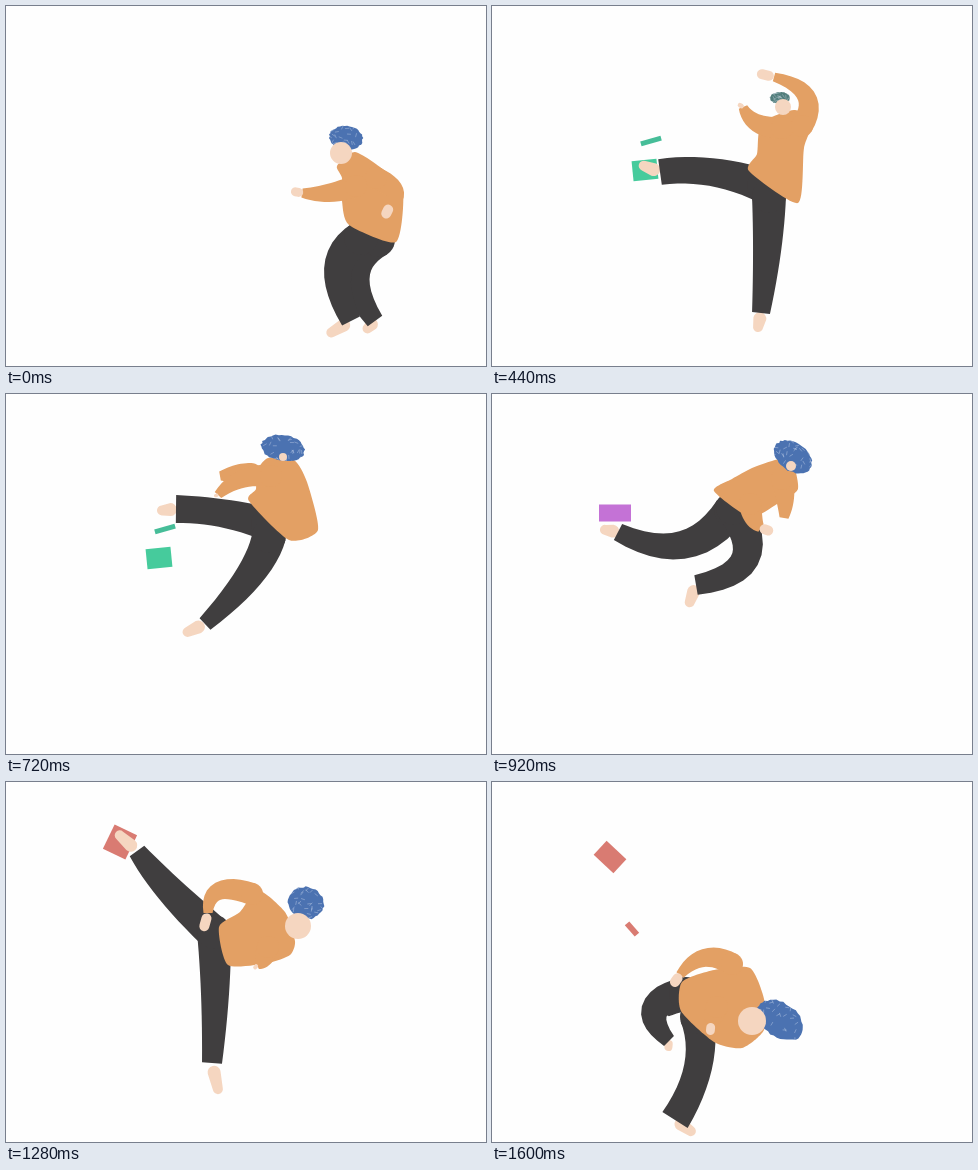
An HTML page with a canvas for the animation above (1.64 s loop, 480 px wide and 360 px high).

```html
<!DOCTYPE html>
<html lang="en">
<head>
<meta charset="utf-8">
<title>Spinning kicks</title>
<style>
html, body { margin: 0; width: 100%; height: 100%; overflow: hidden; background: #fefefe; }
canvas { display: block; width: 480px; height: 360px; }
</style>
</head>
<body>
<canvas id="stage" width="480" height="360"></canvas>
<script>
const LOOP = 1640, STEP = 40;
const CLOTH = '#e3a064', PANTS = '#403e3f', SKIN = '#f5d6c0';
const BLUE = [75, 114, 177], GREY = [82, 126, 124];
const ctx = document.getElementById('stage').getContext('2d');

// Key poses. Limbs: root, middle joint, cuff, tip. Torso: outline, clockwise.
// Face: x, y, radius. Hair: x, y, two radii, turn. Cuffs: trouser half widths.
const poses = [
  {
    legA: [372,234, 350,268, 369,315, 358,326], legB: [355,232, 332,264, 345,315, 321,329],
    armP: [350,180, 322,187, 296,187, 285,185], armQ: [370,172, 389,186, 384,200, 378,212],
    torso: [331,160, 349,146, 378,164, 397,185, 390,236, 343,219, 336,195, 336,172],
    face: [335,147,11], hair: [340,132,17,12,.1], cuffs: [9,10], tint: BLUE
  },
  {
    legA: [301,222, 317,270, 353,315, 377,327], legB: [280,222, 300,280, 274,321, 281,341],
    armP: [315,165, 320,188, 326,211, 355,232], armQ: [305,172, 308,190, 318,207, 318,207],
    torso: [306,141, 322,145, 330,157, 329,214, 314,222, 260,216, 274,190, 290,155],
    face: [328,142,11], hair: [330,125,21,9,-.1], cuffs: [8,8], tint: BLUE
  },
  {
    legA: [272,180, 219,166, 168,166, 147,158], legB: [277,190, 275,245, 269,307, 265,326],
    armP: [310,120, 314,90, 282,71, 265,67], armQ: [290,122, 265,117, 251,101, 246,98],
    torso: [278,112, 302,104, 322,112, 312,142, 306,197, 257,165, 265,148, 267,126],
    face: [291,101,8], hair: [288,92,10,6,0], cuffs: [13,9], tint: GREY
  },
  {
    legA: [262,130, 215,119, 170,115, 151,117], legB: [263,142, 243,182, 199,230, 177,240],
    armP: [265,82, 236,85, 212,101, 208,102], armQ: [245,80, 230,80, 214,82, 214,82],
    torso: [262,64, 288,66, 301,88, 312,136, 283,146, 243,107, 250,95, 250,78],
    face: [277,63,4], hair: [277,54,22,13,.15], cuffs: [14,8], tint: BLUE
  },
  {
    legA: [239,116, 190,151, 126,138, 108,135], legB: [241,114, 253,165, 204,191, 196,213],
    armP: [290,85, 293,105, 292,124, 292,124], armQ: [258,110, 262,125, 269,134, 281,138],
    torso: [280,67, 299,65, 306,95, 285,110, 258,123, 222,97, 240,85, 260,74],
    face: [299,72,5], hair: [301,63,21,14,.6], cuffs: [9,10], tint: BLUE
  },
  {
    legA: [207,150, 163,107, 131,69, 110,50], legB: [208,150, 209,212, 206,281, 213,312],
    armP: [246,112, 213,109, 202,131, 197,149], armQ: [262,165, 257,177, 251,183, 248,187],
    torso: [279,130, 289,159, 284,173, 262,181, 222,183, 213,145, 234,130, 252,108],
    face: [292,144,13], hair: [300,121,18,16,.3], cuffs: [9,10], tint: BLUE
  },
  {
    legA: [194,212, 163,229, 177,259, 176,269], legB: [205,235, 206,285, 183,338, 203,352],
    armP: [240,182, 212,176, 188,193, 180,204], armQ: [225,225, 221,236, 219,242, 218,253],
    torso: [258,186, 272,217, 272,248, 250,266, 222,260, 189,229, 190,200, 222,188],
    face: [260,239,14], hair: [288,238,26,17,.6], cuffs: [7,15], tint: BLUE
  }
];

// time in ms, position in the pose list
const timing = [[0, 0], [240, 1], [440, 2], [560, 2.75], [720, 3], [920, 4],
  [1120, 4.5], [1280, 5], [1360, 5.15], [1600, 6]];

const lerp = (a, b, k) => a + (b - a) * k;
const mixList = (a, b, k) => a.map((v, i) => lerp(v, b[i], k));
const pairs = a => a.flatMap((v, i) => i % 2 ? [] : [[v, a[i + 1]]]);

// Blend bone angles and lengths so that limbs swing on arcs.
function mixLimb(a, b, k) {
  const A = pairs(a), B = pairs(b);
  let [x, y] = mixList(A[0], B[0], k);
  return A.map((p, i) => {
    if (i) {
      const ax = p[0] - A[i - 1][0], ay = p[1] - A[i - 1][1];
      const bx = B[i][0] - B[i - 1][0], by = B[i][1] - B[i - 1][1];
      const from = Math.atan2(ay, ax), d = Math.atan2(by, bx) - from;
      const turn = from + Math.atan2(Math.sin(d), Math.cos(d)) * k;
      const len = lerp(Math.hypot(ax, ay), Math.hypot(bx, by), k);
      x += len * Math.cos(turn);
      y += len * Math.sin(turn);
    }
    return [x, y];
  });
}

function poseAt(t) {
  const i = timing.findIndex(([ms]) => ms >= t) || 1;
  const [t0, u0] = timing[i - 1], [t1, u1] = timing[i];
  const u = lerp(u0, u1, (t - t0) / (t1 - t0));
  const n = Math.min(Math.floor(u), poses.length - 2);
  const a = poses[n], b = poses[n + 1], out = {};
  for (const key in a) out[key] = (/^(leg|arm)/.test(key) ? mixLimb : mixList)(a[key], b[key], u - n);
  return out;
}

function fill(color, path) {
  ctx.fillStyle = color;
  ctx.beginPath();
  path();
  ctx.closePath();
  ctx.fill();
}

const disc = (color, x, y, r) => fill(color, () => ctx.arc(x, y, r, 0, 2 * Math.PI));

function blob(color, pts, soft = 1 / 9) {
  const n = pts.length, at = i => pts[(i + n) % n];
  fill(color, () => {
    ctx.moveTo(...pts[0]);
    for (let i = 0; i < n; i++) {
      const [p, a, b, q] = [at(i - 1), at(i), at(i + 1), at(i + 2)];
      ctx.bezierCurveTo(a[0] + (b[0] - p[0]) * soft, a[1] + (b[1] - p[1]) * soft,
        b[0] - (q[0] - a[0]) * soft, b[1] - (q[1] - a[1]) * soft, b[0], b[1]);
    }
  });
}

// Tapered tube along the parabola through three joints, round at the root.
function tube(color, [a, b, c], [ra, rb, rc]) {
  const through = (p, q, r, s) =>
    p * (1 - s) * (1 - 2 * s) + q * 4 * s * (1 - s) + r * s * (2 * s - 1);
  const at = s => [through(a[0], b[0], c[0], s), through(a[1], b[1], c[1], s)];
  const edge = (s, side) => {
    const [x, y] = at(s), p = at(s - .01), q = at(s + .01);
    const turn = Math.atan2(q[1] - p[1], q[0] - p[0]), r = side * through(ra, rb, rc, s);
    ctx.lineTo(x - r * Math.sin(turn), y + r * Math.cos(turn));
  };
  fill(color, () => {
    for (let i = 0; i <= 12; i++) edge(i / 12, 1);
    for (let i = 12; i >= 0; i--) edge(i / 12, -1);
  });
  disc(color, ...a, ra);
}

// Hand or foot between cuff and tip; it vanishes when they meet.
function skin([, , cuff, tip], r0, r1) {
  const dx = tip[0] - cuff[0], dy = tip[1] - cuff[1];
  const len = Math.hypot(dx, dy), turn = Math.atan2(dy, dx), q = Math.PI / 2;
  const a = Math.min(r0, len * .4), b = Math.min(r1, len * .4), end = 1 - b / (len || 1);
  fill(SKIN, () => {
    ctx.arc(cuff[0] + dx * .3, cuff[1] + dy * .3, a, turn + q, turn - q + 2 * Math.PI);
    ctx.arc(cuff[0] + dx * end, cuff[1] + dy * end, b, turn - q, turn + q);
  });
}

function random(seed) {
  return () => {
    seed = (seed * 16807) % 2147483647;
    return seed / 2147483647;
  };
}

function drawHair({ hair: [x, y, rx, ry, turn], tint }, t) {
  const rnd = random(t * 31 + 17);
  ctx.save();
  ctx.translate(x, y);
  ctx.rotate(turn);
  fill(`rgb(${tint.map(Math.round)})`, () => {
    for (let i = 0; i < 44; i++) {
      const a = i / 44 * 2 * Math.PI, k = .95 + .09 * rnd();
      ctx.lineTo(rx * k * Math.cos(a), ry * k * Math.sin(a));
    }
  });
  ctx.clip();
  ctx.strokeStyle = 'rgba(225,232,245,.4)';
  ctx.lineWidth = .8;
  ctx.beginPath();
  for (let i = 0; i < 32; i++) {
    const px = rx * (2 * rnd() - 1), py = ry * (2 * rnd() - 1), a = rnd() * 6.3;
    ctx.moveTo(px, py);
    ctx.lineTo(px + 4 * Math.cos(a), py + 4 * Math.sin(a));
  }
  ctx.stroke();
  ctx.restore();
}

function board(color, x, y, w, h, turn) {
  ctx.save();
  ctx.translate(x, y);
  ctx.rotate(turn);
  ctx.fillStyle = color;
  ctx.fillRect(-w / 2, -h / 2, w, h);
  ctx.restore();
}

function drawBoards(t) {
  if (t >= 400 && t < 800) {
    board('#46cb9c', 153, 164, 25, 20, -.1);
    board('#46bd98', 159, 135, 21, 5, -.27);
  }
  if (t >= 840 && t < 1080) board('#c472d6', 123, 119, 32, 17, 0);
  if (t >= 1200) {
    const k = Math.max(0, (t - 1280) / 320);
    board('#d97b72', ...mixList([114, 60, 25, 27, .45], [118, 75, 27, 19, .75], k));
    if (k) board('#d97b72', lerp(117, 140, k), 60 - 250 * k + 337 * k * k, 15, 6, .85);
  }
}

function draw(t) {
  const p = poseAt(t);
  ctx.fillStyle = '#fefefe';
  ctx.fillRect(0, 0, 480, 360);
  drawBoards(t);
  [p.legA, p.legB].forEach((leg, i) => {
    skin(leg, 6.5, 5);
    tube(PANTS, leg, [17, 14, p.cuffs[i]]);
  });
  blob(CLOTH, pairs(p.torso));
  const arms = [p.armQ, p.armP];
  for (const arm of arms) tube(CLOTH, arm, [11, 9, 4.5]);
  drawHair(p, t);
  disc(SKIN, ...p.face);
  for (const arm of arms) skin(arm, 5, 5);
}

const start = performance.now();
function tick() {
  const t = (performance.now() - start) % LOOP;
  draw(Math.floor(t / STEP) * STEP);
  requestAnimationFrame(tick);
}
tick();
</script>
</body>
</html>
```
